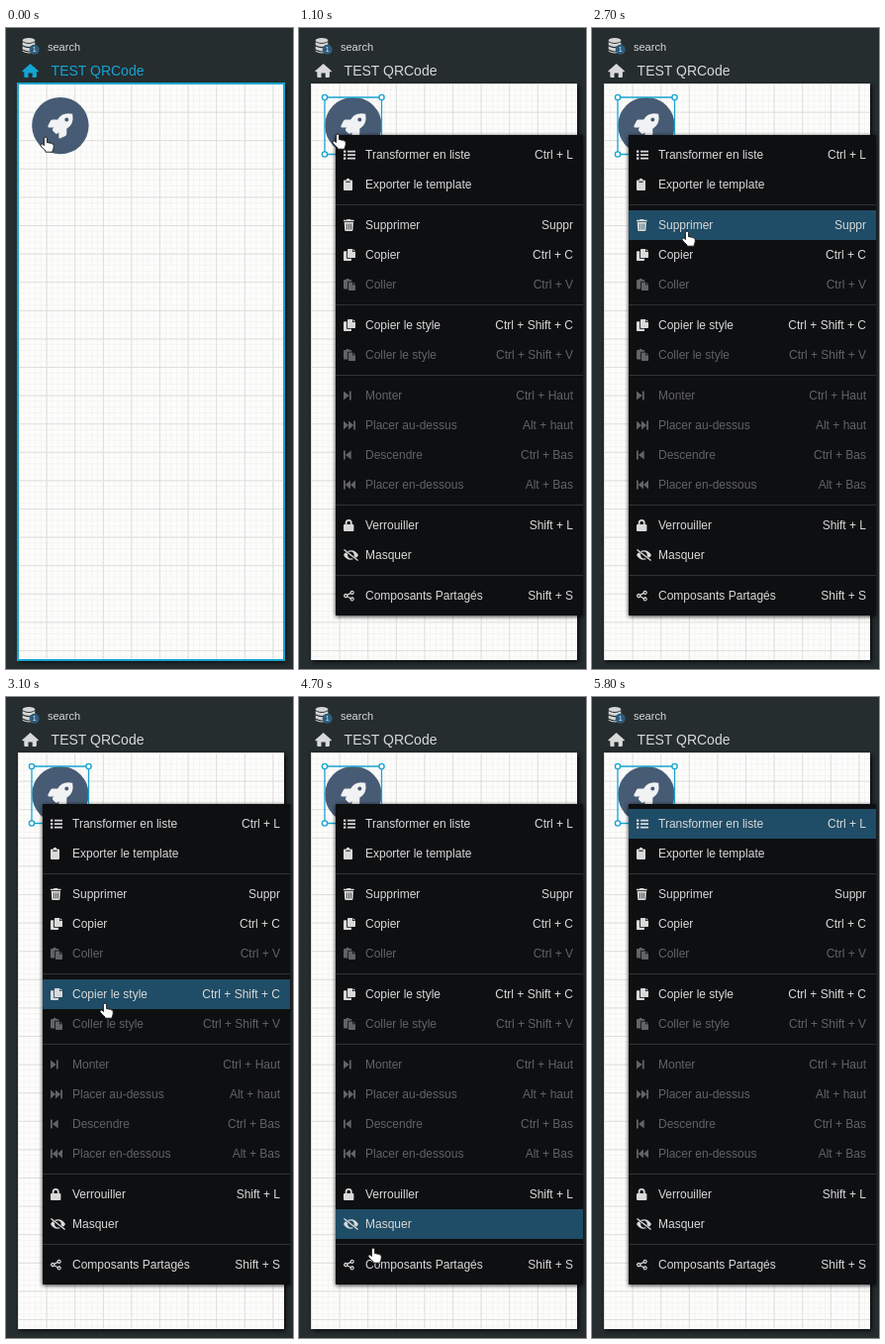
An HTML page for the animation above (6100 ms loop, 290 px wide and 647 px high).

```html
<!DOCTYPE html>
<html lang="fr">
<head>
<meta charset="utf-8">
<style>
  html, body { margin: 0; height: 100%; overflow: hidden; background: #262d2f; }
  svg { display: block; font: 12px "Liberation Sans", Arial, sans-serif; }
  .paper { fill: #fdfdfc; filter: drop-shadow(2px 2px 2px #000b); }
  .menu { fill: #0e0f11; filter: drop-shadow(0 1px 2px #000c); }
  .on { fill: #d9d9d9; }
  .off { fill: #626365; }
  .off, .on { stroke: none; }
  .accent { fill: none; stroke: #1ba4cf; }
</style>
</head>
<body>
<svg id="stage" width="290" height="647" viewBox="0 0 290 647">
  <defs>
    <pattern id="minor" width="5.72" height="5.72" patternUnits="userSpaceOnUse" x="12" y="56">
      <path d="M0 .4H5.72M.4 0V5.72" stroke="#f3f1ef" stroke-width=".8"/>
    </pattern>
    <pattern id="major" width="28.6" height="28.6" patternUnits="userSpaceOnUse" x="12" y="56">
      <path d="M0 .5H28.6M.5 0V28.6" stroke="#dededc"/>
    </pattern>
  </defs>

  <g fill="#d6d6d4">
    <ellipse cx="23" cy="12.6" rx="6.3" ry="2.5"/>
    <path d="M16.7 14.2q6.3 3.4 12.6 0v3q-6.3 3.6-12.6 0zM16.7 18.6q6.3 3.4 12.6 0v3q-6.3 3.6-12.6 0zM16.7 22.8q6.3 3.2 12.6 0v1q-6.3 3.4-12.6 0z"/>
  </g>
  <circle cx="28.7" cy="21.8" r="5" fill="#2b5c7e"/>
  <text x="28.7" y="24.3" font-size="7" text-anchor="middle" fill="#e8eef2">1</text>
  <text x="42" y="23" font-size="11" fill="#d9d9d9">search</text>
  <g id="title">
    <path d="M24.6 36 33 43.4q-.2.9-1.2.9h-.9v4.5q0 1.2-1.2 1.2h-3v-4.5h-4.2V50h-3q-1.2 0-1.2-1.2v-4.5h-.9q-1 0-1.2-.9z"/>
    <text x="45.6" y="48" font-size="14">TEST QRCode</text>
  </g>

  <path class="paper" d="M12 56H281V638H12z"/>
  <path fill="url(#minor)" d="M12 56H281V638H12z"/>
  <path fill="url(#major)" d="M12 56H281V638H12z"/>
  <path id="focus" class="accent" stroke-width="2" d="M12 56H281V638H12z"/>

  <circle cx="54.9" cy="98.6" r="28.7" fill="#475b74"/>
  <path transform="translate(42.2 86.2)" fill="#f1f2f3" fill-rule="evenodd"
    d="M25 .6Q14.500-1.600 10 6.300H5q-1.600 0-2.400 1.400L.2 12.500Q-.2 14 1.200 14.200H6.200L5.100 15.400Q4.300 16.400 5.100 17.500L7.800 20.200Q9 21 10 20.200L11.200 19V24.200Q11.500 25.600 12.900 25.100L17.800 22.700Q19.100 22 19.100 20.500V15.500Q27 11 25 .6zM19.100 4.400a2 2 0 1 1 0 4 2 2 0 0 1 0-4z"/>

  <g id="picked">
    <path class="accent" stroke-width="1.3" d="M26 70H83.500V127.500H26z"/>
    <g fill="#fff" stroke="#1ba4cf" stroke-width="1.4">
      <circle cx="26" cy="70" r="2.6"/><circle cx="83.500" cy="70" r="2.6"/><circle cx="26" cy="127.500" r="2.6"/>
    </g>
    <path class="menu" d="M37 108H287V593H37z"/>
    <rect id="hover" x="37" width="250" height="30" fill="#1f4c66"/>
    <g id="items"></g>
  </g>
  <path id="hand" fill="#fff" stroke="#111" stroke-width=".9" stroke-linejoin="round"
    d="M4.400 2.200a1.600 1.600 0 0 1 3.200 0V6.300q1.600-.8 2.400.5 1.500-.7 2.200.5 2-.3 2 1.400v2.600c0 1.400-1 2-1 3.200v1.200H6v-1.200Q3.500 12.600 1.200 9.600C.2 8 2 6.800 3.100 7.800l1.300 1.300z"/>
</svg>
<script>
const icons = {
  list: "M0 1.500h2.400v2.200H0zM4 1.800h8v1.600H4zM0 5h2.400v2.200H0zM4 5.300h8v1.600H4zM0 8.500h2.400v2.200H0zM4 8.800h8v1.600H4z",
  clipboard: "M1 1.500H2.700a1.800 1.800 0 0 1 3.600 0H8q1 0 1 1V11q0 1-1 1H1q-1 0-1-1V2.500q0-1 1-1zM2.400 2.800v1h4.200v-1z",
  trash: "M0 .8H3L3.600 0H7l.6.8h3v1.500H0zM.7 3.100H9.900L9.400 11q-.1 1-1.100 1H2.300q-1 0-1.100-1zM2.900 4.500v6h.7v-6zM5 4.500v6h.7v-6zM7 4.500v6h.7v-6z",
  copy: "M4.800 0H9v3h3v5.300q0 .7-.7.7H4.800q-.8 0-.8-.7V.7Q4 0 4.800 0zM9.700 0 12 2.300H9.700zM.7 2.300H3.200V9.700H8v1.600q0 .7-.7.7H.7Q0 12 0 11.300V3q0-.7.7-.7z",
  paste: "M.8 1H2.500a1.700 1.700 0 0 1 3.300 0H7.500q.8 0 .8.800v1H5.300q-1.200 0-1.200 1.200v6.500H.8Q0 10.500 0 9.700V1.800Q0 1 .8 1zM5.600 3.600H9v2.700h3v5q0 .7-.7.7H5.600q-.7 0-.7-.7v-7q0-.7.7-.7zM9.700 3.600 12 5.600H9.700z",
  next: "M0 1.500 5.700 6 0 10.500zM5.900 1.500H7.700v9H5.900z",
  last: "M0 1.500 5 6V1.500L10.200 6V1.500H12v9H10.200V6L5 10.500V6L0 10.500z",
  prev: "M7.700 1.500 2 6 7.700 10.500zM0 1.500H1.800v9H0z",
  first: "M12 1.500 7 6V1.500L1.800 6V1.500H0v9H1.800V6L7 10.500V6L12 10.500z",
  lock: "M1.700 5V3.500a3.500 3.500 0 0 1 7 0V5h.7q1 0 1 1v5q0 1-1 1H1q-1 0-1-1V6q0-1 1-1zM3.500 5H6.900V3.500a1.700 1.700 0 0 0-3.400 0z",
  hidden: "M.9 0 15 11.100 14.200 12 0 1zM4 2Q11-.8 15 6q-.8 1.600-2.200 2.700L10.600 7A3.400 3.400 0 0 0 5.500 3.100zM2.200 3.300 4.200 5A3.400 3.400 0 0 0 8.500 9.200L10 10.300Q3.300 12 0 6q.8-1.500 2.200-2.700z",
  share: "M8.700.7a2.100 2.100 0 1 1-1.600 3.500L4.300 5.700v.8L7.100 8a2.100 2.100 0 1 1-.5 1L3.800 7.600a2.200 2.200 0 1 1 0-3.100L6.600 3A2.200 2.200 0 0 1 8.700.7zM8.700 2a.8.8 0 1 0 .1 0zM2.200 5.200a.8.8 0 1 0 .1 0zM8.700 8.700a.8.8 0 1 0 .1 0z"
};

// [icon, label, shortcut, disabled]; null is a separator
const entries = [
  ["list", "Transformer en liste", "Ctrl + L"],
  ["clipboard", "Exporter le template", ""],
  null,
  ["trash", "Supprimer", "Suppr"],
  ["copy", "Copier", "Ctrl + C"],
  ["paste", "Coller", "Ctrl + V", true],
  null,
  ["copy", "Copier le style", "Ctrl + Shift + C"],
  ["paste", "Coller le style", "Ctrl + Shift + V", true],
  null,
  ["next", "Monter", "Ctrl + Haut", true],
  ["last", "Placer au-dessus", "Alt + haut", true],
  ["prev", "Descendre", "Ctrl + Bas", true],
  ["first", "Placer en-dessous", "Alt + Bas", true],
  null,
  ["lock", "Verrouiller", "Shift + L"],
  ["hidden", "Masquer", ""],
  null,
  ["share", "Composants Partagés", "Shift + S"]
];

const $ = id => document.getElementById(id);
const rowTop = {};
let y = 113, markup = "";
for (const entry of entries) {
  if (!entry) {
    markup += `<path d="M37 ${y + 5.5}H287" stroke="#303234"/>`;
    y += 11;
    continue;
  }
  const [icon, label, keys, disabled] = entry;
  rowTop[label] = y;
  markup += `<g class="${disabled ? "off" : "on"}">
    <path transform="translate(45 ${y + 9})" fill-rule="evenodd" d="${icons[icon]}"/>
    <text x="67" y="${y + 19}">${label}</text>
    <text x="277" y="${y + 19}" text-anchor="end">${keys}</text></g>`;
  y += 30;
}
$("items").innerHTML = markup;

// Pointer tip: [ms, x, y], linear between entries
const path = [
  [0, 40, 109.500], [100, 41, 110], [200, 40, 109], [500, 40, 109], [600, 39, 107], [1700, 39, 107],
  [2400, 93, 127], [3100, 100, 309], [3800, 94, 415], [4100, 83, 482], [4400, 87, 527], [4500, 87, 527],
  [4700, 75, 556], [4800, 75, 556], [4900, 76, 566], [5100, 76, 566], [5200, 80, 380], [5300, 80, 380],
  [5400, 82, 309], [5500, 84, 226], [5600, 86, 128], [5700, 88, 33], [6100, 88, 33]
];
const hovers = [
  [0, ""], [2000, "Transformer en liste"], [2500, "Exporter le template"], [2700, "Supprimer"],
  [2800, "Copier"], [2900, ""], [3100, "Copier le style"], [3200, ""], [4200, "Verrouiller"],
  [4400, "Masquer"], [4900, "Composants Partagés"], [5200, ""], [5400, "Copier le style"],
  [5500, "Copier"], [5600, "Transformer en liste"]
];

const show = (id, visible) => $(id).setAttribute("visibility", visible ? "visible" : "hidden");

function draw(now) {
  const t = Math.floor(now % 6100 / 100) * 100; // the pointer is sampled ten times a second
  const open = t >= 1100;
  $("title").setAttribute("fill", open ? "#d9d9d9" : "#13a5d5");
  show("focus", !open);
  show("picked", open);

  const row = rowTop[hovers.findLast(h => h[0] <= t)[1]];
  show("hover", open && row);
  $("hover").setAttribute("y", row || 0);

  const i = path.findIndex(p => p[0] > t);
  const [t0, x0, y0] = path[i - 1], [t1, x1, y1] = path[i];
  const k = (t - t0) / (t1 - t0);
  const px = Math.round(x0 + (x1 - x0) * k), py = Math.round(y0 + (y1 - y0) * k);
  $("hand").setAttribute("transform", `translate(${px - 6} ${py - .5})`);
  show("hand", t < 5800);
}

const start = performance.now();
(function tick() {
  draw(performance.now() - start);
  requestAnimationFrame(tick);
})();
</script>
</body>
</html>
```
